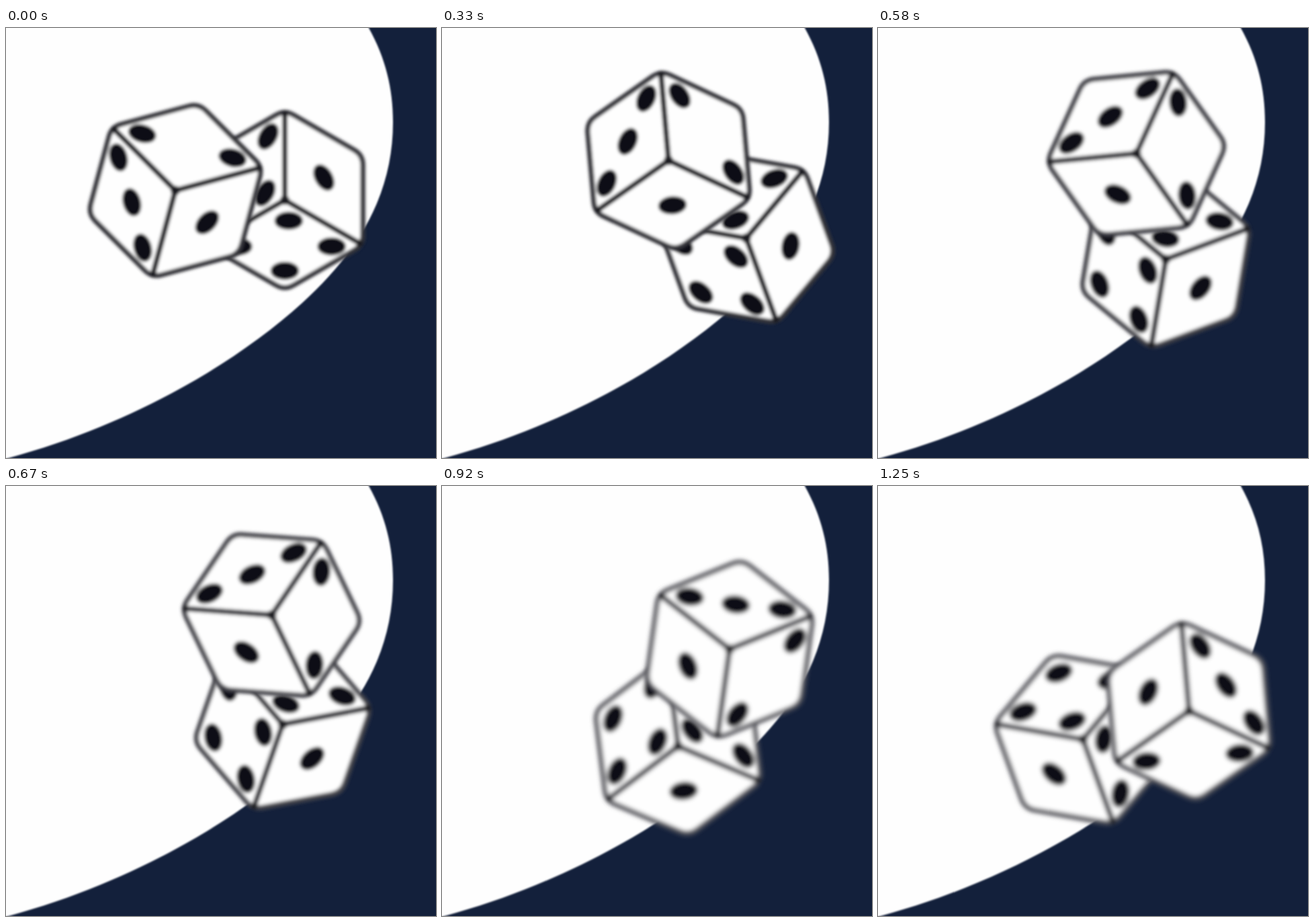
These frames come from a looping animation (640 by 640 pixels, 1.33 s). An HTML page:

```html
<!DOCTYPE html>
<html lang="en">
<head>
<meta charset="utf-8">
<title>Rolling dice</title>
<style>
  html, body { margin: 0; width: 100%; height: 100%; overflow: hidden; background: #13203b; }
  svg { display: block; width: 100%; height: 100%; }
  .pips { fill: #111115; stroke: #111115; stroke-width: 5.5px; }
  .pips circle { vector-effect: non-scaling-stroke; }
</style>
</head>
<body>
<svg viewBox="0 0 640 640">
  <defs>
    <filter id="edge" x="-5%" y="-5%" width="110%" height="110%"><feGaussianBlur stdDeviation="1.1"/></filter>
    <filter id="soft" x="-15%" y="-15%" width="130%" height="130%"><feGaussianBlur id="blur" stdDeviation="2.2"/></filter>
  </defs>
  <rect width="640" height="640" fill="#13203b"/>
  <path filter="url(#edge)" fill="#fefefe"
    d="M-20-20H530L540 0C565 45 576 90 576 140C576 245 528 330 440 410C345 496 190 590 4 640L-20 647Z"/>
  <g id="dice"></g>
</svg>
<script>
const LOOP = 1330, STEPS = 16, R = 134, REACH = 81.8;
const LO = 0.215, HI = 0.815, PIP = 0.112;

// step, turn in degrees, middle of the pair
const KEYS = [
  [0, 0, 333.5, 249],
  [2, 20.2, 364.5, 249.5],
  [4, 40, 395, 255],
  [7, 69.5, 406.5, 265.5],
  [10, 100, 393, 296.5],
  [13, 140, 385, 353],
  [15, 160, 384, 356]
];

const diagonal = [[HI, LO], [LO, HI]];
const PIPS = {
  one: [[.5, .5]],
  two: diagonal,
  three: [...diagonal, [.5, .5]],
  four: [...diagonal, [.255, .205], [.785, .785]]
};

const polar = (deg, r) => {
  const a = deg * Math.PI / 180;
  return [r * Math.cos(a), r * Math.sin(a)];
};
const mix = (a, b, k) => a + (b - a) * k;
const along = (p, q, k) => [mix(p[0], q[0], k), mix(p[1], q[1], k)];
const gray = (a, b, k) => `rgb(${a.map((v, i) => Math.round(mix(v, b[i], k)))})`;

function roundedHex(start) {
  const v = [0, 1, 2, 3, 4, 5].map(i => polar(start + 60 * i, R));
  return v.map((p, i) => {
    const a = along(p, v[(i + 5) % 6], .11), b = along(p, v[(i + 1) % 6], .11);
    return `${i ? 'L' : 'M'}${a}Q${p} ${b}`;
  }).join('') + 'Z';
}

// A die seen corner-on: three spokes, and one face between each pair
function die(start, faces) {
  const spokes = [0, 120, 240].map(d => polar(start + d, R));
  const lines = spokes.map(p => `M0 0L${along([0, 0], p, .97)}`).join('');
  const joints = [[0, 0, 7], ...spokes.map(p => [...along([0, 0], p, .96), 5])]
    .map(([x, y, r]) => `<circle cx="${x}" cy="${y}" r="${r}"/>`).join('');
  const pips = faces.map((name, i) => {
    const p = spokes[i], q = spokes[(i + 1) % 3];
    const dots = PIPS[name].map(([u, v]) => `<circle cx="${u}" cy="${v}" r="${PIP}"/>`).join('');
    return `<g transform="matrix(${p} ${q} 0 0)">${dots}</g>`;
  }).join('');
  return `<g filter="url(#soft)"><g class="body">
    <path class="rim" d="${roundedHex(start)}" fill="#fefefe" stroke-width="7.5"/>
    <path class="spoke" d="${lines}" stroke-width="8"/>
    <g fill="#1b1b20">${joints}</g><g class="pips">${pips}</g></g></g>`;
}

document.getElementById('dice').innerHTML =
  die(-90, ['one', 'four', 'four']) + die(-135, ['two', 'one', 'three']);

const [back, front] = document.querySelectorAll('.body');
const rims = document.querySelectorAll('.rim');
const spokes = document.querySelectorAll('.spoke');
const blur = document.getElementById('blur');

function slope(i, c) {
  const a = KEYS[Math.max(i - 1, 0)], b = KEYS[Math.min(i + 1, KEYS.length - 1)];
  return (b[c] - a[c]) / (b[0] - a[0]);
}

function track(step, c) {
  let i = 0;
  while (i < KEYS.length - 2 && step >= KEYS[i + 1][0]) i++;
  const a = KEYS[i], b = KEYS[i + 1], span = b[0] - a[0];
  const k = (step - a[0]) / span, k2 = k * k, k3 = k2 * k;
  return a[c] * (2 * k3 - 3 * k2 + 1) + b[c] * (3 * k2 - 2 * k3)
    + span * (slope(i, c) * (k3 - 2 * k2 + k) + slope(i + 1, c) * (k3 - k2));
}

function stepAt(ms) {
  let i = STEPS - 1;
  while (i > 0 && Math.round(i * 25 / 3) * 10 > ms) i--;
  return i;
}

function draw(ms) {
  const step = stepAt(ms % LOOP);
  const [turn, x, y] = [1, 2, 3].map(c => track(step, c));
  const [dx, dy] = polar(turn + 5, REACH);
  front.setAttribute('transform', `translate(${x - dx} ${y - dy}) rotate(${turn})`);
  back.setAttribute('transform', `translate(${x + dx} ${y + dy}) rotate(${turn})`);

  // Lines fade and soften in the second half
  const fade = Math.min(Math.max((step - 5) / 6, 0), 1);
  blur.setAttribute('stdDeviation', mix(2.2, 3, fade));
  rims.forEach(e => e.setAttribute('stroke', gray([52, 52, 58], [86, 86, 93], fade)));
  spokes.forEach(e => e.setAttribute('stroke', gray([32, 32, 38], [56, 56, 63], fade)));
}

function tick(now) {
  draw(now);
  requestAnimationFrame(tick);
}
draw(0);
requestAnimationFrame(tick);
</script>
</body>
</html>
```
